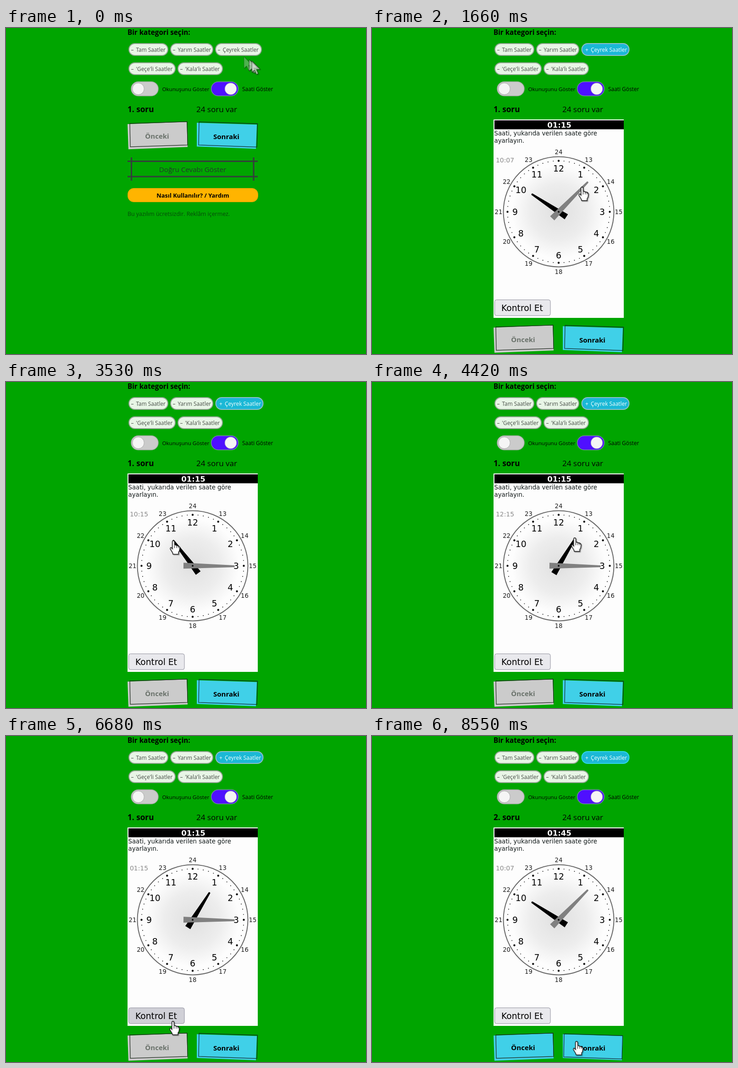
Recreate the animation shown at these times as an HTML page with a canvas. Size 785x713 px, loop 8.75 s.

```html
<!DOCTYPE html>
<html lang="tr">
<head>
<meta charset="utf-8">
<title>Saat alıştırması</title>
<style>
html, body { margin: 0; width: 100%; height: 100%; overflow: hidden; background: #00a500; }
canvas { display: block; }
</style>
</head>
<body>
<canvas id="stage" width="785" height="713"></canvas>
<script>
const ctx = document.getElementById('stage').getContext('2d');
const LOOP = 8750;
const GREEN = '#00a500', CYAN = '#40d0e8';
const UI = '"Open Sans", "Noto Sans", sans-serif';
const CLOCK = '"DejaVu Sans", sans-serif';
const CX = 407, CY = 402;

// Moments at which the page changes state
const OPEN = 600, CHECK = 6820, NEXT = 8350;

// Pointer path before and after the hour hand is dragged: time, x, y, shape from that time on
const POINTER = [
  [-140, 519, 63, 'arrow'], [0, 536, 72, 'arrow'], [130, 536, 72, 'arrow'],
  [400, 507, 46, 'hand'], [1030, 507, 45, 'arrow'], [1660, 458, 348, 'hand'],
  [1870, 458, 348, 'hand'], [2150, 471, 395, 'hand'], [2420, 471, 395, 'hand'],
  [2560, 480, 402, 'hand'], [2640, 480, 402, 'arrow'], [3150, 350, 365, 'hand'],
  [3320, 350, 365, 'hand']
];
const POINTER_AFTER = [
  [4020, 442, 341, 'hand'], [5640, 442, 341, 'arrow'], [5840, 447, 345, 'arrow'],
  [6400, 364, 618, 'hand'], [6540, 364, 624, 'hand'], [7720, 364, 624, 'arrow'],
  [8150, 446, 668, 'hand'], [LOOP, 446, 668, 'hand']
];

const clamp = v => Math.max(0, Math.min(1, v));
const mix = (a, b, k) => a + (b - a) * k;
const smooth = k => k * k * (3 - 2 * k);
const progress = (t, from, to) => smooth(clamp((t - from) / (to - from)));
const two = n => String(n).padStart(2, '0');

function hourAngle(t) {
  return 303.5 + 87.5 * progress(t, 3320, 4020) + 0.8 * clamp((t - 4815) / 5);
}

function minuteAngle(t) {
  return mix(44.3, 90.7, progress(t, 1870, 2150));
}

function pointerAt(t) {
  if (t > 3320 && t < 4020) {
    const a = (hourAngle(t) - 90) * Math.PI / 180;
    return { x: CX + 69 * Math.cos(a), y: CY + 69 * Math.sin(a), shape: 'hand' };
  }
  const keys = t <= 3320 ? POINTER : POINTER_AFTER;
  let i = 0;
  while (i < keys.length - 2 && t >= keys[i + 1][0]) i++;
  const [t0, x0, y0, shape] = keys[i], [t1, x1, y1] = keys[i + 1];
  const k = progress(t, t0, t1);
  return { x: mix(x0, x1, k), y: mix(y0, y1, k), shape };
}

function text(str, x, y, size, color, { font = UI, weight = 400, align = 'left' } = {}) {
  ctx.font = `${weight} ${size}px ${font}`;
  ctx.textAlign = align;
  ctx.fillStyle = color;
  ctx.fillText(str, x, y);
}

function paint(fill, stroke, width = 1) {
  if (fill) { ctx.fillStyle = fill; ctx.fill(); }
  if (stroke) { ctx.strokeStyle = stroke; ctx.lineWidth = width; ctx.stroke(); }
}

function box(x, y, w, h, r, fill, stroke, width) {
  ctx.beginPath();
  ctx.roundRect(x, y, w, h, r);
  paint(fill, stroke, width);
}

function disc(x, y, r, fill, stroke, width) {
  ctx.beginPath();
  ctx.arc(x, y, r, 0, 2 * Math.PI);
  paint(fill, stroke, width);
}

// coords is a flat list x, y, x, y, ...
function poly(coords, fill, stroke, width) {
  ctx.beginPath();
  for (let i = 0; i < coords.length; i += 2) ctx.lineTo(coords[i], coords[i + 1]);
  ctx.closePath();
  paint(fill, stroke, width);
}

function chip(label, x, y, w) {
  box(x + 1, y, w - 2, 26, 13, '#e8f5e6', '#8fa58f', 2);
  text('–', x + 5.5, y + 17.5, 12, '#454c45');
  text(label, x + 16.5, y + 17.5, 11.8, '#454c45');
}

function selectedChip(t) {
  box(457.5, 34, 103, 26, 13, '#1bb8d6', t < CHECK ? '#8fbccb' : '#2fd6e6', 2);
  text(t < 1100 ? '*' : '+', 465, 51.5, 12, '#f4ffff');
  text('Çeyrek Saatler', 477, 51.5, 11.9, '#f4ffff');
}

function toggle(x, on) {
  box(x + 0.5, 117.5, 59, 31, 15.5, on ? '#4f10ff' : '#cbcbcb', on ? '#6d8f96' : '#a3aca3', 1.5);
  const knob = x + (on ? 43 : 16);
  disc(knob, 133, 12.8, '#f5f5f5', on ? '#a9a3c8' : '#a8a8a8', 1);
}

function header(t, opened, second) {
  text('Bir kategori seçin:', 265, 15, 15.2, '#000', { weight: 700 });
  chip('Tam Saatler', 267, 34, 87);
  chip('Yarım Saatler', 358, 34, 94);
  if (opened) selectedChip(t);
  else chip('Çeyrek Saatler', 456, 34, 102);
  chip("'Geçe'li Saatler", 267, 76, 103);
  chip("'Kala'lı Saatler", 374, 76, 99);
  toggle(272.5, false);
  toggle(447, true);
  text('Okunuşunu Göster', 340.5, 138, 11.6, '#000');
  text('Saati Göster', 515, 138, 11.9, '#000');
  text(second ? '2. soru' : '1. soru', 265, 184, 17.2, '#000', { weight: 700 });
  text('24 soru var', 415, 184, 17, '#000');
}

function navButtons(y, second) {
  ctx.save();
  ctx.translate(0, y - 0.7);
  poly([265, 211, 394, 206, 396, 261, 267, 266], second ? CYAN : '#cbcbcb');
  poly([270, 209.5, 395, 205.5, 396, 256.5, 271, 260.5], null, '#1c241c', 1.2);
  text('Önceki', 329.5, 242.5, 15, second ? '#000' : '#69716a', { weight: 700, align: 'center' });

  poly([416, 208, 547, 212, 545, 265, 416, 260], CYAN);
  const shift = second ? -2 : 0;
  ctx.translate(shift, -shift / 2);
  poly([421, 206, 548.5, 210, 547, 261, 420, 256.5], null, '#0d2a30', 1.2);
  ctx.translate(-shift, shift / 2);
  text('Sonraki', 480.5, 243.5, 15, '#000', { weight: 700, align: 'center' });
  ctx.restore();
}

function footer() {
  ctx.fillStyle = '#343e3b';
  for (const y of [290, 323.5]) ctx.fillRect(265, y, 284, 3);
  for (const x of [272, 538.5]) ctx.fillRect(x, 283, 3, 51);
  text('Doğru Cevabı Göster', 407, 315, 15.2, '#20382a', { align: 'center' });
  box(265.5, 350.5, 284, 30, 13, '#ffb400', '#c9a400', 1);
  text('Nasıl Kullanılır? / Yardım', 407.5, 371, 12.9, '#000', { weight: 700, align: 'center' });
  text('Bu yazılım ücretsizdir. Reklâm içermez.', 265, 411, 12.4, '#054a0a');
}

function dialText(n, radius, angle, size, color) {
  text(n, CX + radius * Math.sin(angle), CY - radius * Math.cos(angle) + size * 0.365,
    size, color, { font: CLOCK, align: 'center' });
}

function dial() {
  const glow = ctx.createRadialGradient(CX, CY, 0, CX, CY, 102);
  glow.addColorStop(0, '#e0e0e0');
  glow.addColorStop(0.6, '#ededed');
  glow.addColorStop(1, '#fdfdfd');
  disc(CX, CY, 120.5, glow, '#686868', 2);
  for (let m = 0; m < 60; m++) {
    const a = m * Math.PI / 30;
    disc(CX + 111.5 * Math.sin(a), CY - 111.5 * Math.cos(a), m % 5 ? 0.95 : 2.2, '#111');
  }
  for (let h = 1; h <= 12; h++) {
    const a = h * Math.PI / 6;
    dialText(h, 95, a, 18.8, '#000');
    dialText(h + 12, 131, a, 13.2, '#1c1c1c');
  }
}

function clockHand(angle, length, color) {
  ctx.save();
  ctx.translate(CX, CY);
  ctx.rotate((angle - 90) * Math.PI / 180);
  poly([-20, -6.5, length, -2, length + 1, 0, length, 2, -20, 6.5], color);
  ctx.restore();
}

function panel(t, second, pointer) {
  ctx.fillStyle = '#fdfdfd';
  ctx.fillRect(265, 200, 284, 434);
  ctx.fillStyle = '#000';
  ctx.fillRect(267, 202, 282, 19.5);
  text(second ? '01:45' : '01:15', 408.5, 218, 16.5, '#fff',
    { font: CLOCK, weight: 700, align: 'center' });
  text('Saati, yukarıda verilen saate göre', 266.5, 235, 13.3, '#101818', { font: CLOCK });
  text('ayarlayın.', 266.5, 251, 13.3, '#101818', { font: CLOCK });

  const hour = hourAngle(second ? 0 : t), minute = minuteAngle(second ? 0 : t);
  const shownHour = (Math.floor((hour - 1.6) / 30) + 11) % 12 + 1;
  text(two(shownHour) + ':' + two(Math.floor(minute / 6)), 270, 294, 13.9, '#8a8a8a', { font: CLOCK });

  dial();
  clockHand(hour, 70, '#000');
  clockHand(minute, 91, '#808080');
  disc(CX, CY, 2, '#111');

  const { x, y } = pointer;
  const hover = x > 267 && x < 389 && y > 594 && y < 629;
  box(267.5, 594.5, 121.5, 34.5, 4, hover ? '#d0d0d7' : '#e9e9ed', '#8f8f9d', 1);
  text('Kontrol Et', 282, 618.5, 18.7, '#000', { font: CLOCK });
  if (t >= CHECK && !second) text('Doğru', 451.5, 623.5, 28.8, '#0b8a17', { font: CLOCK });
}

function drawPointer({ x, y, shape }, alpha) {
  ctx.save();
  ctx.translate(x, y);
  ctx.globalAlpha = alpha;
  ctx.lineJoin = 'round';
  ctx.shadowColor = 'rgba(0,0,0,.35)';
  ctx.shadowBlur = 2;
  ctx.shadowOffsetX = ctx.shadowOffsetY = 1.5;
  if (shape === 'arrow') {
    poly([0, 0, 0, 25, 5.7, 20, 10, 29.5, 14, 27.5, 10, 18.5, 18, 18], '#fff', '#222', 1.1);
  } else {
    poly([-2.5, 2, -1.5, 0, 1.5, 0, 2.5, 2, 2.5, 9, 6, 9.5, 7, 10.5, 10, 11, 11, 12, 13, 12.5,
      14, 15, 13, 22, 11, 25, 11, 29.5, -1, 29.5, -2, 26, -7, 18, -6.5, 15, -4, 15, -2.5, 18],
      '#fff', '#151515', 1.3);
    ctx.shadowColor = 'transparent';
    ctx.beginPath();
    for (const kx of [2.5, 7, 11]) {
      ctx.moveTo(kx, 10);
      ctx.lineTo(kx, 16);
    }
    paint(null, '#151515', 1);
  }
  ctx.restore();
}

// A moving arrow is translucent and leaves two fading copies behind
function pointerTrail(t, pointer) {
  const ghosts = [[140, 0.3], [55, 0.6]].map(([lag, alpha]) => [pointerAt(t - lag), alpha]);
  const moving = pointer.shape === 'arrow' && ghosts.some(([past]) =>
    Math.hypot(past.x - pointer.x, past.y - pointer.y) > 2);
  if (moving) ghosts.forEach(([past, alpha]) => drawPointer(past, alpha));
  drawPointer(pointer, moving ? 0.6 : 1);
}

function draw(time) {
  const t = time < 130 ? 0 : time;
  const opened = t >= OPEN, second = t >= NEXT;
  const pointer = pointerAt(t);
  ctx.fillStyle = GREEN;
  ctx.fillRect(0, 0, 785, 713);
  header(t, opened, second);
  if (opened) panel(t, second, pointer);
  else footer();
  navButtons(opened ? 445 : 0, second);
  pointerTrail(t, pointer);
}

const start = performance.now();
function tick() {
  draw((performance.now() - start) % LOOP);
  requestAnimationFrame(tick);
}
tick();
</script>
</body>
</html>
```
